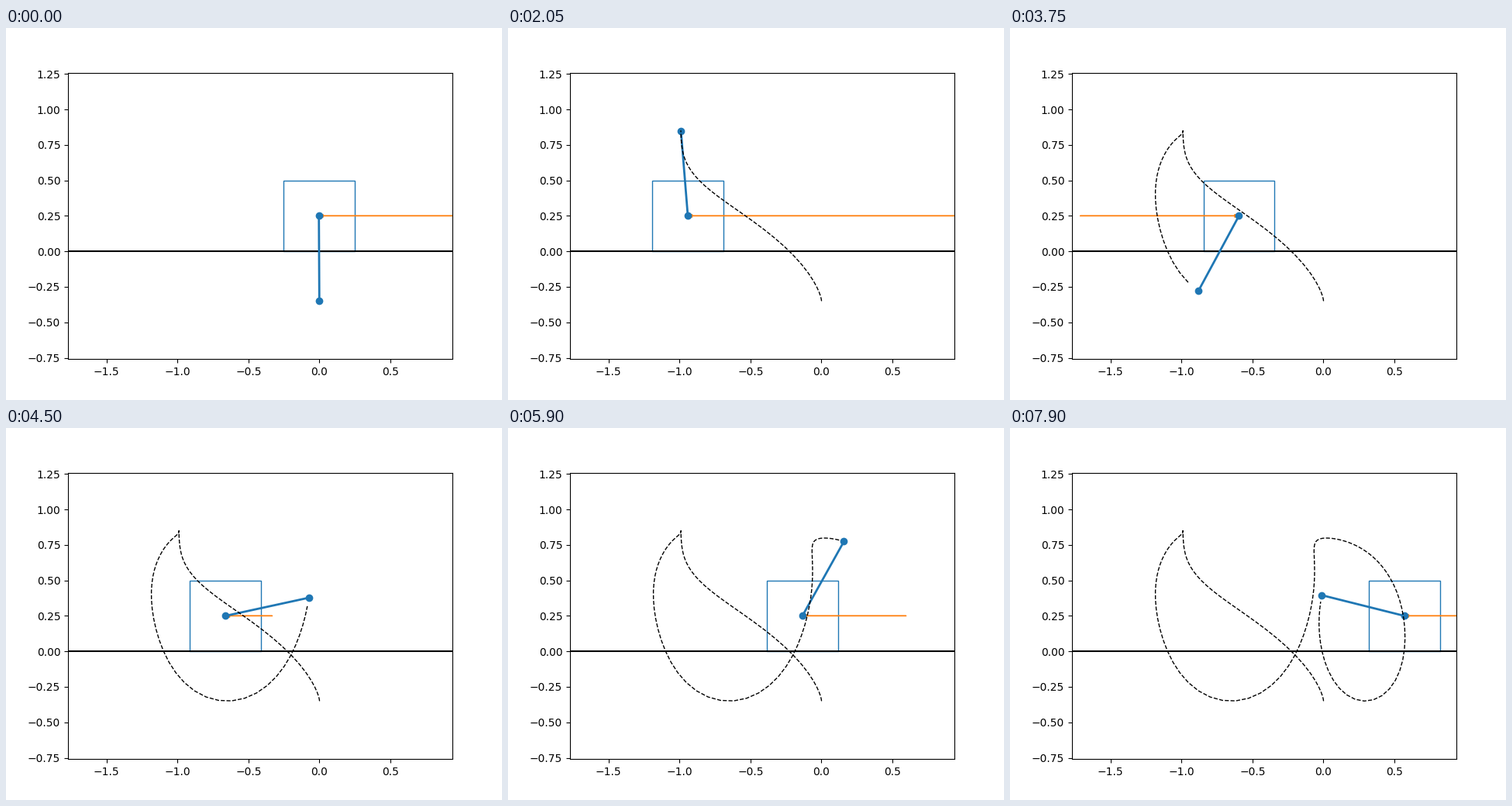
Animation, 640 px wide and 480 px high, one loop 9150 ms. Source, as a matplotlib script:

```python
import numpy as np
import matplotlib.pyplot as plt
from matplotlib.animation import FuncAnimation
from matplotlib.patches import FancyArrow, Rectangle

STEPS = 159        # moving steps, the last one is held
FRAMES = 183
INTERVAL = 50
DT = 0.02          # simulated seconds per step
G = 9.81
POLE = 0.6
SIDE = 0.5
PIVOT = SIDE / 2

# step, cart position, pole angle (0 = hanging down)
POSES = np.array([
    (0, -.005, .009), (7, -.357, .57), (14, -1.0, 1.417), (22, -1.405, 2.007),
    (30, -1.332, 2.505), (38, -1.032, 3.08), (49, -.818, 3.503),
    (60, -.683, 3.99), (68, -.568, 4.713), (76, -.614, 5.98),
    (83, -.732, 7.225), (90, -.661, 8.072), (95, -.548, 8.483),
    (106, -.311, 8.96), (118, -.133, 8.912), (133, -.040, 7.94),
    (142, .193, 6.649), (148, .465, 5.54), (158, .572, 4.48),
])

# step, push on the cart (positive pushes right)
PUSH = np.array([
    (0, -8), (11, 0), (22, 8), (33, 0), (40, -3), (50, 0), (62, 2.4),
    (76, 1.02), (90, -.33), (114, -.71), (133, -.81), (142, -2.4), (158, -2),
])


def solve_motion(poses, rounds=12):
    """Smoothest cart motion through the poses that swings a free pole."""
    eye = np.eye(STEPS)
    acc = np.diff(eye, 2, axis=0) / DT ** 2
    jerk = np.diff(acc, axis=0)
    pick = eye[poses[:, 0].astype(int)]
    none = np.zeros_like

    # start from plain smooth curves through the poses
    rows = np.vstack([200 * pick, 0.05 * jerk])
    goal = np.vstack([200 * poses[:, 1:], np.zeros((len(jerk), 2))])
    x, a = np.linalg.lstsq(rows, goal, rcond=None)[0].T

    # Gauss-Newton on: L a'' + x'' cos(a) + g sin(a) = 0
    for _ in range(rounds):
        s, c = np.sin(a[1:-1]), np.cos(a[1:-1])
        ax_ = acc @ x
        swing = POLE * (acc @ a) + ax_ * c + G * s
        by_angle = POLE * acc + (G * c - ax_ * s)[:, None] * eye[1:-1]
        jac = np.block([
            [5 * c[:, None] * acc, 5 * by_angle],
            [0.5 * jerk, none(jerk)],
            [200 * pick, none(pick)],
            [none(pick), 100 * pick],
        ])
        res = np.concatenate([
            5 * swing, 0.5 * jerk @ x,
            200 * (pick @ x - poses[:, 1]), 100 * (pick @ a - poses[:, 2]),
        ])
        dx, da = np.split(np.linalg.lstsq(jac, -res, rcond=None)[0], 2)
        x, a = x + dx, a + da
    return x, a


cart, angle = solve_motion(POSES)
push = np.interp(np.arange(STEPS), PUSH[:, 0], PUSH[:, 1])
tip_x = cart + POLE * np.sin(angle)
tip_y = PIVOT - POLE * np.cos(angle)

fig, ax = plt.subplots(figsize=(6.4, 4.8), dpi=100)
ax.set_xlim(-1.771, 0.9365)
ax.set_ylim(PIVOT - 1.00875, PIVOT + 1.00875)
ax.set_xticks(np.arange(-1.5, 0.6, 0.5))
ax.set_yticks(np.arange(-0.75, 1.3, 0.25))

box = Rectangle((0, 0), SIDE, SIDE, fill=False, ec="C0", lw=1, zorder=1)
ax.add_patch(box)
ax.axhline(0, color="k", lw=1.5, zorder=2)
arrow = FancyArrow(0, PIVOT, 1, 0, width=0.001, head_width=0.02,
                   head_length=0.03, length_includes_head=True,
                   color="C1", lw=1, zorder=3)
ax.add_patch(arrow)
pole, = ax.plot([], [], "o-", color="C0", lw=2, zorder=4)
trail, = ax.plot([], [], "k--", lw=1, zorder=5)


def update(frame):
    k = min(frame, STEPS - 1)
    x = cart[k]
    box.set_x(x - SIDE / 2)
    arrow.set_data(x=x - push[k], dx=push[k])
    pole.set_data([x, tip_x[k]], [PIVOT, tip_y[k]])
    trail.set_data(tip_x[:k], tip_y[:k])
    return box, arrow, pole, trail


anim = FuncAnimation(fig, update, frames=FRAMES, interval=INTERVAL,
                     repeat=True, repeat_delay=0)
plt.show()
```
